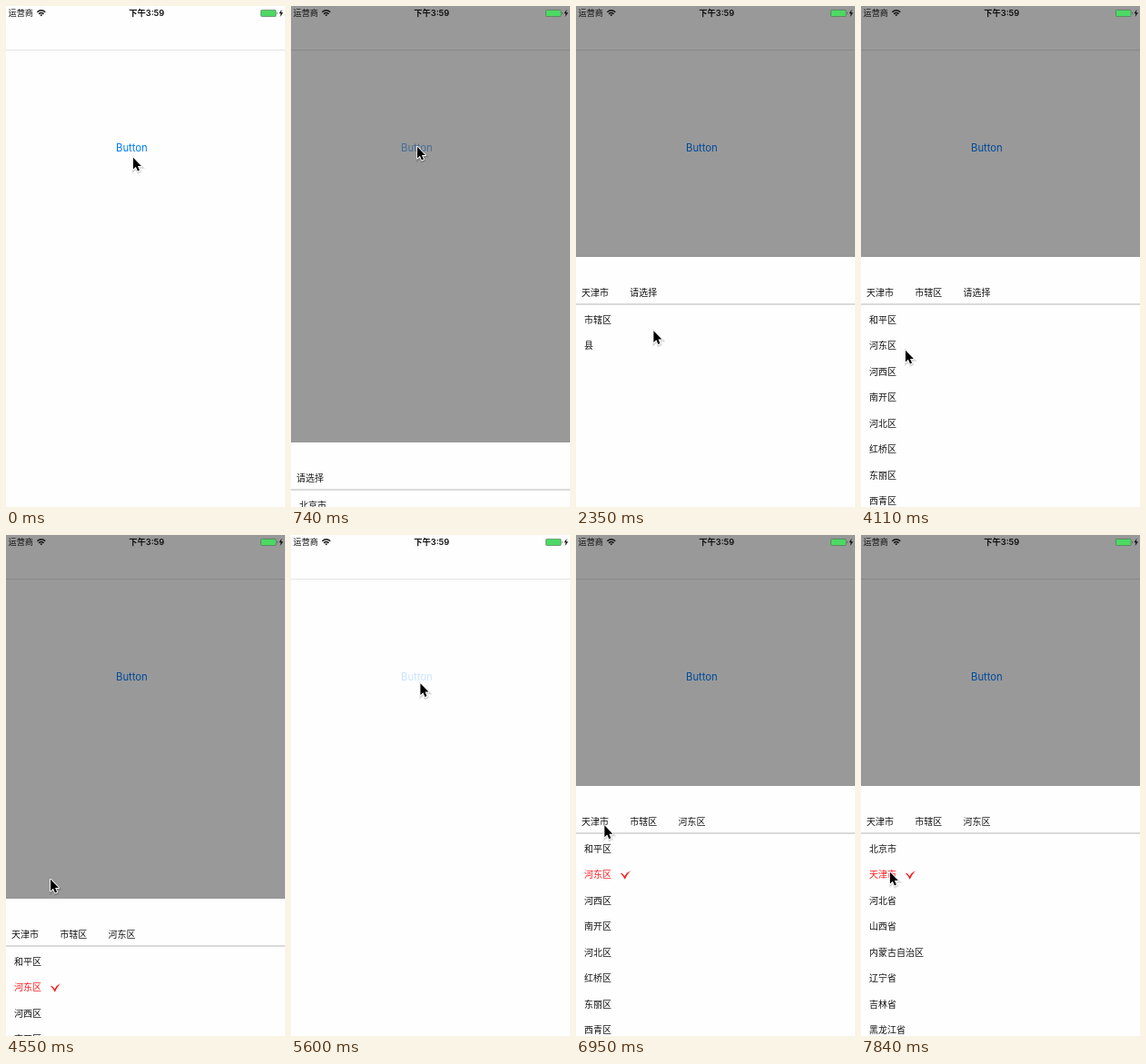
An HTML page that plays this animation: 307 px wide and 551 px high, repeating every 7.99 s.

```html
<!DOCTYPE html>
<html lang="zh-CN">
<head>
<meta charset="utf-8">
<title>Region picker</title>
<style>
  html, body { margin: 0; width: 100%; height: 100%; overflow: hidden; background: #fefefe; }
  svg { display: block; width: 100vw; height: 100vh; }
  text { font: 10px "Noto Sans CJK SC", "Noto Sans CJK", sans-serif; fill: #111; white-space: pre; }
  #button { font: 11.3px Inter, sans-serif; fill: #007aff; text-anchor: middle; }
  .status { font-size: 9.1px; }
  .time { font: 600 9.3px Inter, "Noto Sans CJK SC", "Noto Sans CJK", sans-serif; text-anchor: middle; }
  .on text { fill: #fa1a1e; }
  .tick { fill: #f5151c; visibility: hidden; }
  .on .tick { visibility: visible; }
</style>
</head>
<body>
<svg viewBox="0 0 307 551">
  <rect width="307" height="551" fill="#fefefe"/>
  <rect y="48" width="307" height="1" fill="#e4e4e4"/>
  <text id="button" x="138.4" y="159.6">Button</text>
  <rect id="shade" width="307" height="551" opacity=".4"/>

  <g id="sheet">
    <rect width="307" height="280" fill="#fefefe"/>
    <g id="tabs"></g>
    <rect y="51.5" width="307" height="1" fill="#b8b8b8"/>
    <g id="pages"></g>
  </g>

  <text class="status" x="2.6" y="11.2">运营商</text>
  <g fill="none" stroke="#111" stroke-width="1.4">
    <path d="M34.3 6.8Q38.8 2.6 43.3 6.8M36 8.7Q38.8 6.2 41.6 8.7"/>
    <path d="M37.2 9.8Q38.8 8.6 40.4 9.8L38.8 11.3Z" fill="#111" stroke="none"/>
  </g>
  <text class="time" x="154.7" y="11.3">下午3:59</text>
  <rect x="280.5" y="4.4" width="16.6" height="7.1" rx="1" fill="#4cd964" stroke="#4a6a50" stroke-width=".6"/>
  <path d="M298 6.5q1.2 1.4 0 2.8Z" fill="#333"/>
  <path d="M303.6 3.8L300.4 8.3H302.4L301.6 12L305 7.2H302.8Z" fill="#111"/>

  <g id="cursor">
    <g transform="translate(.4 1.2) scale(.88)">
      <path d="M0 0V14.6L3.4 11.5L5.7 16.8L8 15.8L5.7 10.6H10.2Z"
        transform="translate(.6 1.4)" fill="none" stroke="#000" stroke-opacity=".14" stroke-width="3.4"/>
      <path d="M0 0V14.6L3.4 11.5L5.7 16.8L8 15.8L5.7 10.6H10.2Z"
        stroke="#fff" stroke-width="2" stroke-linejoin="round" paint-order="stroke"/>
    </g>
  </g>
</svg>
<script>
const LOOP = 7990, WIDTH = 307, OPEN_Y = 276, CLOSED_Y = 551, ROW = 28.5;
const $ = id => document.getElementById(id);

function add(parent, tag, attrs, text = '') {
  const el = document.createElementNS('http://www.w3.org/2000/svg', tag);
  for (const key in attrs) el.setAttribute(key, attrs[key]);
  el.textContent = text;
  return parent.appendChild(el);
}

const lists = [
  '北京市 天津市 河北省 山西省 内蒙古自治区 辽宁省 吉林省 黑龙江省',
  '市辖区 县',
  '和平区 河东区 河西区 南开区 河北区 红桥区 东丽区 西青区'
];
const pages = lists.map((list, i) => {
  const page = add($('pages'), 'g', { transform: `translate(${i * WIDTH} 0)` });
  return list.split(' ').map((name, r) => {
    const row = add(page, 'g', { transform: `translate(0 ${69 + r * ROW})` });
    add(row, 'text', { x: 9.1, y: 3.9 }, name);
    add(row, 'path', { class: 'tick', d: 'M49 -1.6Q51 -2.4 53.4 2Q56 -2.6 60 -4.2Q56 0 53.8 5.2Q51.6 .6 49 -1.6Z' });
    return row;
  });
});
const tabs = [5.9, 59.3, 112.6].map(x => add($('tabs'), 'text', { x, y: 43 }));

// Row index chosen on each page, and when it is tapped
const picks = [{ row: 1, at: 1880 }, { row: 0, at: 2930 }, { row: 1, at: 4400 }];
const presses = [580, 5600];

const cursorPath = [
  [0, 139.5, 165.5], [250, 139.5, 165.5], [590, 138.5, 153.5], [890, 138.5, 153.5],
  [1320, 144, 312], [1900, 50, 372], [2060, 50, 372], [2346, 85, 356], [2493, 73, 351],
  [2640, 69, 348], [3090, 69, 348], [3960, 48, 378], [4106, 48.6, 377.5], [4560, 48.6, 377.5],
  [5300, 142, 162], [5960, 142, 162], [6500, 101, 319], [7100, 18, 318],
  [7400, 18, 318], [7700, 30, 337], [7850, 31.5, 369.5], [LOOP, 31.5, 369.5]
];

const ease = (t, start, length = 300) => {
  const p = Math.min(1, Math.max(0, (t - start) / length));
  return p * p * (3 - 2 * p);
};

function cursorAt(t) {
  const i = Math.max(1, cursorPath.findIndex(k => k[0] >= t));
  const [a, b] = [cursorPath[i - 1], cursorPath[i]];
  const p = ease(t, a[0], b[0] - a[0]);
  return [a[1] + (b[1] - a[1]) * p, a[2] + (b[2] - a[2]) * p];
}

// The screen refreshes in coarse steps, slightly slower in the second half
function hold(t) {
  t += 10;
  if (t < 290) return 0;
  const [base, step] = t < 4400 ? [0, 440 / 3] : [4400, 150];
  return base + Math.floor((t - base) / step + 1e-6) * step;
}

function buttonOpacity(t) {
  const press = presses.filter(p => t >= p).pop();
  return press === undefined ? 1 : Math.min(1, 0.2 + 0.8 * Math.max(0, t - press - 40) / 260);
}

function render(time) {
  const t = hold(time);
  const raised = ease(t, 633.5) - ease(t, 4410) + ease(t, 5631);
  const shaded = (t > 633 && t < 4710) || t > 5631;
  const scroll = ease(t, 1880) + ease(t, 2948) - 2 * ease(t, 7190);
  const sheetY = Math.round(CLOSED_Y - (CLOSED_Y - OPEN_Y) * raised);

  $('button').setAttribute('opacity', buttonOpacity(t));
  $('shade').setAttribute('visibility', shaded ? 'visible' : 'hidden');
  $('sheet').setAttribute('transform', `translate(0 ${sheetY})`);
  $('pages').setAttribute('transform', `translate(${-WIDTH * scroll} 0)`);

  picks.forEach(({ row, at }, i) => {
    const picked = t >= at, offered = i === 0 || t >= picks[i - 1].at;
    const choice = pages[i][row];
    choice.setAttribute('class', picked ? 'on' : '');
    tabs[i].textContent = picked ? choice.firstChild.textContent : offered ? '请选择' : '';
  });

  $('cursor').setAttribute('transform', `translate(${cursorAt(t)})`);
}

const start = performance.now();
function frame() {
  render((performance.now() - start) % LOOP);
  requestAnimationFrame(frame);
}
frame();
</script>
</body>
</html>
```
